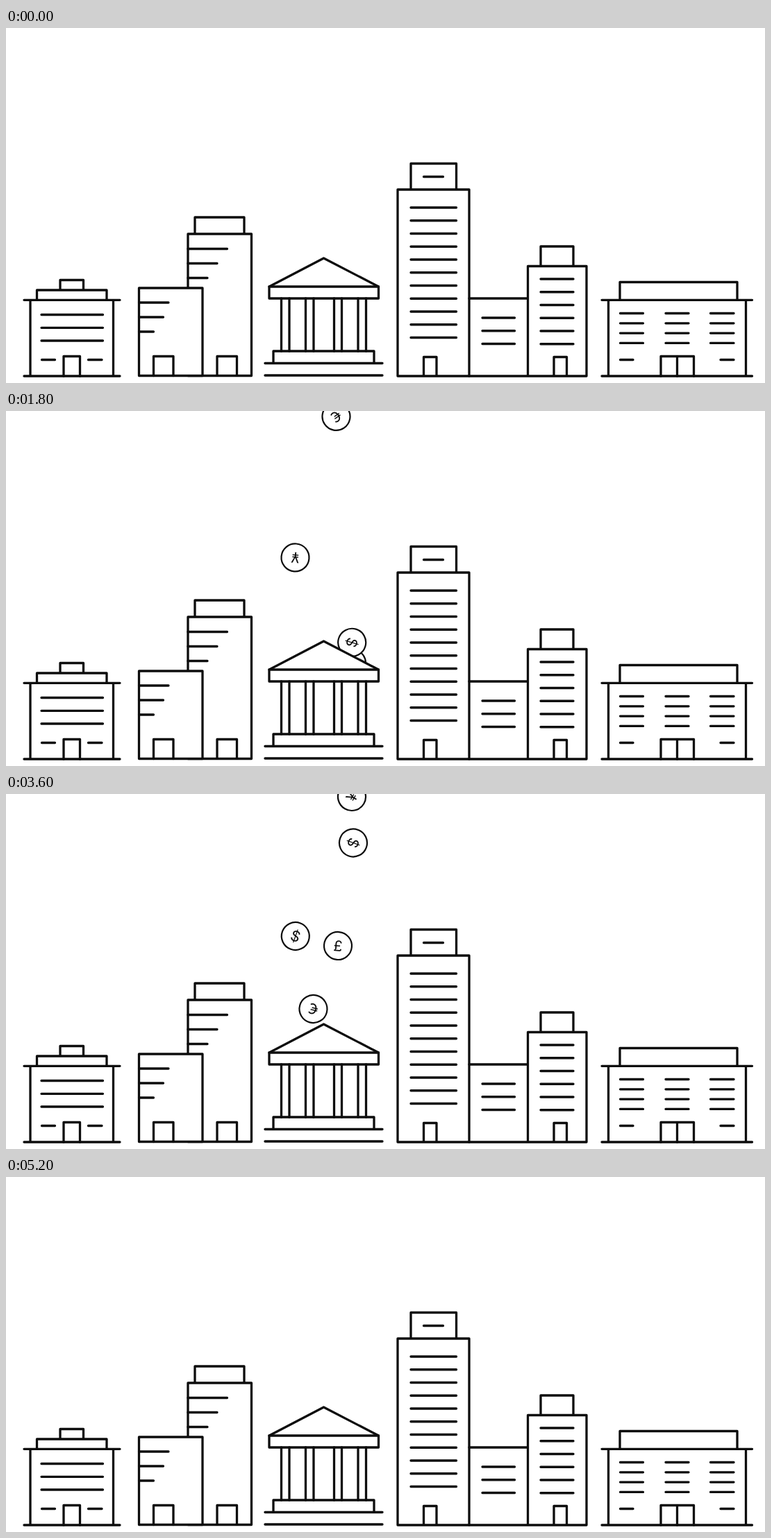
Animation, 1093 px wide and 512 px high, one loop 5600 ms. Source, as an HTML page:

```html
<!DOCTYPE html>
<html lang="en">
<head>
<meta charset="utf-8">
<title>Coins over the bank</title>
<style>
  html, body { margin: 0; width: 100%; height: 100%; overflow: hidden; background: #fff; }
  svg { display: block; width: 100%; height: 100%; }
  .city { fill: none; stroke: #0d0d0d; stroke-width: 3.3; stroke-linecap: round; stroke-linejoin: round; }
  .solid { fill: #fff; }
  .coin circle { fill: #fff; stroke: #0d0d0d; stroke-width: 2.2; }
  .coin text { font: 400 21px Inter, Roboto, sans-serif; text-anchor: middle; fill: #0d0d0d; }
</style>
</head>
<body>
<svg viewBox="0 0 1093 512">
  <clipPath id="sky"><path d="M0 0H1093V374H0Z"/></clipPath>
  <g id="coins" clip-path="url(#sky)"></g>
  <g class="city">
    <!-- small office -->
    <path d="M26 392.3H164M26 502H164M35 392.3V502M154.5 392.3V502"/>
    <path d="M44.5 392.3V378H145V392.3M78 378V363.5H111.5V378M83 502V473.5H106.5V502"/>
    <path d="M51 413.5H139.5M51 432.3H139.5M51 451H139.5M51.5 478.5H70.5M118.5 478.5H138"/>
    <!-- twin blocks -->
    <path d="M262 297H353.5V501.5H262ZM272 297V273H343V297M304 501.5V473.5H332.5V501.5"/>
    <path d="M262 318.5H318.5M262 339.5H304M262 360.5H290"/>
    <path class="solid" d="M191.5 375H283V501.5H191.5Z"/>
    <path d="M212.5 501.5V473.5H241V501.5M191.5 396H234M191.5 417H226.5M191.5 438H212.5"/>
    <!-- bank -->
    <path class="solid" d="M379 373L457.5 332L536.5 373V390H379Z"/>
    <path d="M379 373H536.5M385 483.5V466H530V483.5M373 483.5H542M373 501H542"/>
    <path d="M396.5 390V466M408 390V466M431.5 390V466M443 390V466M472.5 390V466M483.5 390V466M507 390V466M518.5 390V466"/>
    <!-- tower and annex -->
    <path d="M564 233H667V502H564ZM583 233V195.5H648.5V233M601.5 214.5H629.5M601.5 502V474.5H620V502"/>
    <path d="M667 390H751.5M667 502H751.5M751.5 343.5H836V502H751.5ZM770 343.5V315H817V343.5M789 502V474.5H807.5V502"/>
    <!-- hall -->
    <path d="M858 392.3H1074.5M858 502H1074.5M867.5 392.3V502M1065.5 392.3V502M884 392.3V366.5H1053V392.3"/>
    <path d="M943 502V473.5H990.5V502M966.5 473.5V502M884.5 478.5H903M1029 478.5H1048"/>
    <path id="windows"/>
  </g>
</svg>
<script>
const LOOP = 5600, STEP = 40;

const rows = (x1, x2, y, gap, n) =>
  Array.from({ length: n }, (_, i) => `M${x1} ${y + i * gap}H${x2}`).join('');

document.getElementById('windows').setAttribute('d',
  rows(583, 648.5, 259, 18.75, 11) +
  rows(686, 732.5, 418, 18.75, 3) +
  rows(770, 817, 362, 18.75, 6) +
  rows(884.5, 917.5, 411.5, 14.3, 4) +
  rows(950, 983, 411.5, 14.3, 4) +
  rows(1014.5, 1048, 411.5, 14.3, 4));

// At time t0 a coin is at (x, y), turned by a degrees;
// v, h and w, k are the linear and quadratic rates of rise and turn.
const coins = [
  { sign: '€', x: 475.5, t0: 1160, y: 160.5, v: .216, h: 3.5e-5, a: -70, w: .2, k: 4e-5 },
  { sign: '¥', x: 416.5, t0: 1160, y: 307.5, v: .122, h: 4.4e-5, a: -25, w: .18, k: 8.5e-5 },
  { sign: '£', x: 427.5, t0: 2400, y: 230, v: .292, h: 9.7e-5, a: 0, w: .24, k: 5.3e-5 },
  { sign: '¥', x: 498, t0: 2400, y: 288, v: .1629, h: 6.15e-5, a: -25, w: .25, k: 6.6e-5 },
  { sign: '$', x: 498.8, drift: .001, t0: 2400, y: 259, v: .1355, h: 1.8e-5, a: 20, w: .1714, k: 4.46e-5 },
  { sign: '$', x: 416.8, t0: 2960, y: 300.5, v: .1361, h: 2.05e-5, a: 50, w: -.0227, k: 1.09e-4 },
  { sign: '£', x: 478, t0: 2960, y: 324.5, v: .1348, h: 4.7e-5, a: 48, w: .0275, k: 6.2e-5 },
  { sign: '€', x: 442.5, t0: 3600, y: 310, v: .152, h: 3.65e-5, a: 195, w: .08, k: 3.3e-5 }
];

const layer = document.getElementById('coins');
for (const c of coins) {
  c.el = document.createElementNS('http://www.w3.org/2000/svg', 'g');
  c.el.setAttribute('class', 'coin');
  c.el.innerHTML = `<circle r="20"/><text y="7.6">${c.sign}</text>`;
  layer.append(c.el);
}

function draw(t) {
  for (const c of coins) {
    const s = Math.max(t - c.t0, -c.v / (2 * c.h));
    const x = c.x + (c.drift || 0) * s;
    const y = c.y - c.v * s - c.h * s * s;
    const a = c.a - c.w * s - c.k * s * s;
    c.el.setAttribute('transform', `translate(${x} ${y}) rotate(${a})`);
  }
}

function tick() {
  const t = performance.now() % LOOP;
  draw(Math.floor(t / STEP) * STEP);
  requestAnimationFrame(tick);
}
tick();
</script>
</body>
</html>
```
